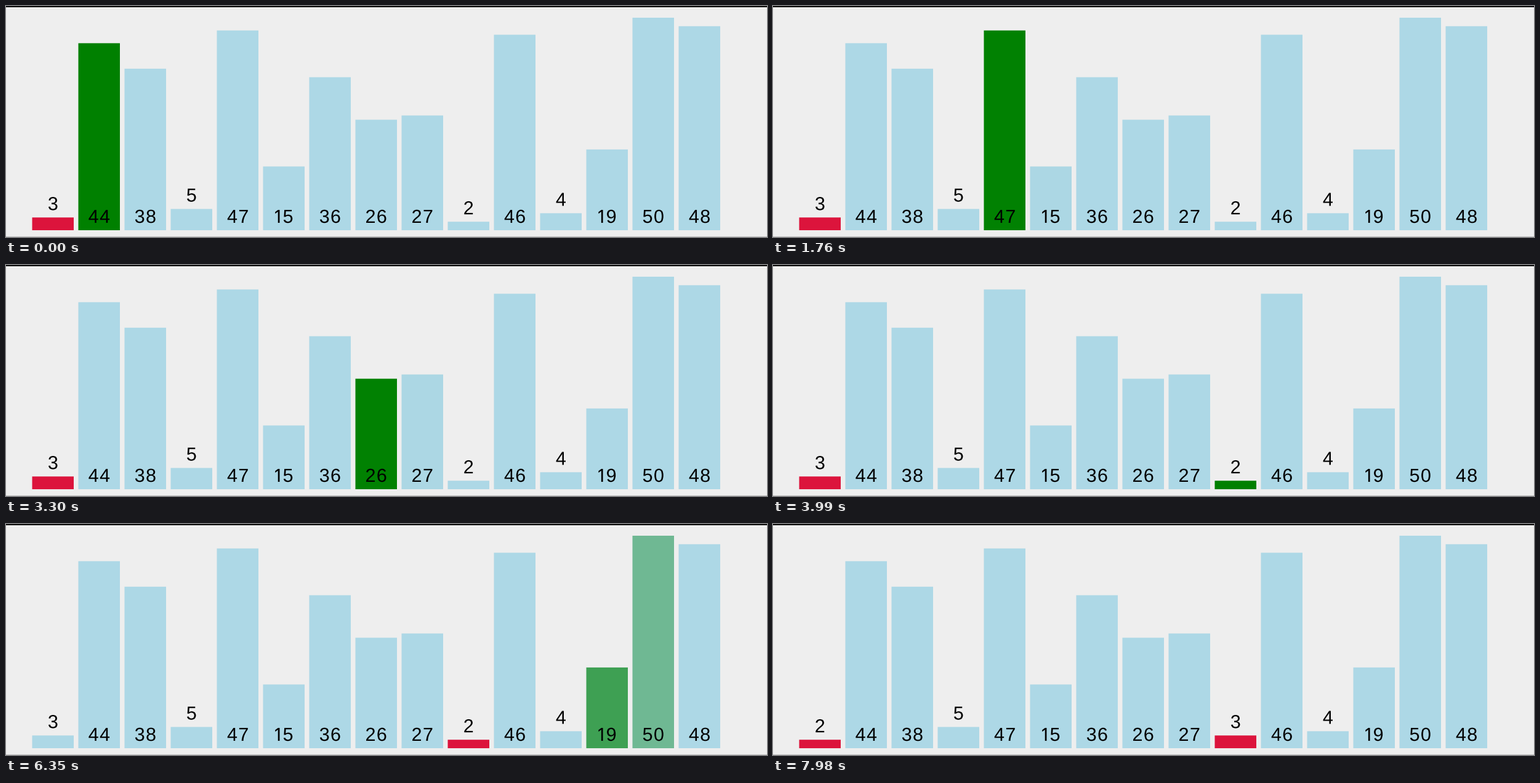
Animation of 1236x375 px, one loop 8000 ms. Source, as a matplotlib script:

```python
import matplotlib.pyplot as plt
import numpy as np
from matplotlib.animation import FuncAnimation
from matplotlib.patches import PathPatch, Rectangle
from matplotlib.path import Path
from matplotlib.textpath import TextPath
from matplotlib.transforms import Affine2D

W, H, DPI = 1236, 375, 100
LOOP, STEP = 8000, 20
VALUES = [3, 44, 38, 5, 47, 15, 36, 26, 27, 2, 46, 4, 19, 50, 48]

LEFT, PITCH, BAR_W = 42.5, 75, 67.5
BASE, UNIT = H - 364, 6.9
LABEL_PAD, LABEL_SIZE = 12, 30.5

BLUE, GREEN, RED = (np.array(c) / 255 for c in
                    [(173, 216, 230), (0, 128, 0), (220, 20, 60)])
FADE = 250


def step_to(j):
    """Move the comparison highlight onto bar j."""
    return {j - 1: BLUE, j: GREEN}


# start, end, number of visible steps, new bar colours
EVENTS = [
    (300, 530, 4, step_to(2)),
    (820, 980, 3, step_to(3)),
    (1290, 1520, 4, step_to(4)),
    (1760, 1990, 4, step_to(5)),
    (2290, 2460, 3, step_to(6)),
    (2780, 3000, 4, step_to(7)),
    (3300, 3530, 4, step_to(8)),
    (3760, 3990, 4, step_to(9)),
    (4310, 4460, 3, {0: BLUE, 9: RED}),
    (4770, 5010, 4, {10: GREEN}),
    (5250, 5470, 4, step_to(11)),
    (5790, 5960, 3, step_to(12)),
    (6270, 6510, 4, step_to(13)),
    (6820, 6970, 3, step_to(14)),
    (7280, 7510, 4, {14: BLUE, 0: RED}),
]
SWAP = (7740, 7980, 4)
SWAPPED = (0, 9)


def ease(u):
    return 4 * u**3 if u < 0.5 else 1 - 4 * (1 - u)**3


def progress(t, start, end, steps):
    """Cubic in-out fade, held between the visible steps."""
    if t < start:
        return 0.0
    if t >= end:
        return 1.0
    gap = (end - start) / (steps - 1)
    lead = 77 if steps == 3 else 32
    return ease(min(1, (lead + (t - start) // gap * gap) / FADE))


def digit(ch):
    """Outline and cell width of one digit; the 1 has no foot."""
    if ch == "1":
        pts = [(4.5, 0), (7.2, 0), (7.2, 21), (4.6, 21),
               (0, 17.6), (0, 14.8), (4.5, 18.1), (4.5, 0)]
        return Path(pts, closed=True), 16
    glyph = TextPath((0, 0), ch, size=LABEL_SIZE,
                     prop={"family": "Liberation Sans"})
    return Path(glyph.vertices, glyph.codes), 18.4


def label_path(text):
    """Digits set in a row, centred on x = 0."""
    parts, x = [], 0
    for ch in text:
        path, cell = digit(ch)
        box = path.get_extents()
        shift = x + cell / 2 - (box.x0 + box.x1) / 2
        parts.append(path.transformed(Affine2D().translate(shift, 0)))
        x += cell
    whole = Path.make_compound_path(*parts)
    box = whole.get_extents()
    return whole.transformed(Affine2D().translate(-(box.x0 + box.x1) / 2, 0))


class Bar:
    def __init__(self, ax, i, value):
        self.home = LEFT + i * PITCH
        height = value * UNIT
        self.rect = Rectangle((self.home, BASE), BAR_W, height, lw=0,
                              snap=False, zorder=2 * i + 1)
        ax.add_patch(self.rect)
        self.label_y = BASE + LABEL_PAD + (height if value <= 5 else 0)
        self.shape = label_path(str(value))
        self.label = PathPatch(self.shape, fc="black", lw=0, snap=False,
                               zorder=2 * i + 2)
        ax.add_patch(self.label)
        self.move(self.home)

    def move(self, x):
        self.rect.set_x(x)
        shift = Affine2D().translate(x + BAR_W / 2, self.label_y)
        self.label.set_path(self.shape.transformed(shift))


fig = plt.figure(figsize=(W / DPI, H / DPI), dpi=DPI, facecolor="#eeeeee")
ax = fig.add_axes([0, 0, 1, 1])
ax.set(xlim=(0, W), ylim=(0, H))
ax.axis("off")
ax.add_patch(Rectangle((0, H - 2), W, 2, fc="black", lw=0))
ax.add_patch(Rectangle((0, 0), W, 1, fc="#bebebe", lw=0))
bars = [Bar(ax, i, v) for i, v in enumerate(VALUES)]


def draw(frame):
    t = frame * STEP + STEP / 2
    colors = [BLUE] * len(bars)
    colors[0], colors[1] = RED, GREEN
    for start, end, steps, targets in EVENTS:
        p = progress(t, start, end, steps)
        for i, target in targets.items():
            colors[i] = colors[i] + (target - colors[i]) * p
    for bar, color in zip(bars, colors):
        bar.rect.set_facecolor(np.clip(color, 0, 1))

    p = progress(t, *SWAP)
    a, b = (bars[i] for i in SWAPPED)
    span = (b.home - a.home) * p
    a.move(a.home + span)
    b.move(b.home - span)
    return []


anim = FuncAnimation(fig, draw, frames=LOOP // STEP, interval=STEP,
                     repeat=True, repeat_delay=0, blit=False)
plt.show()
```
